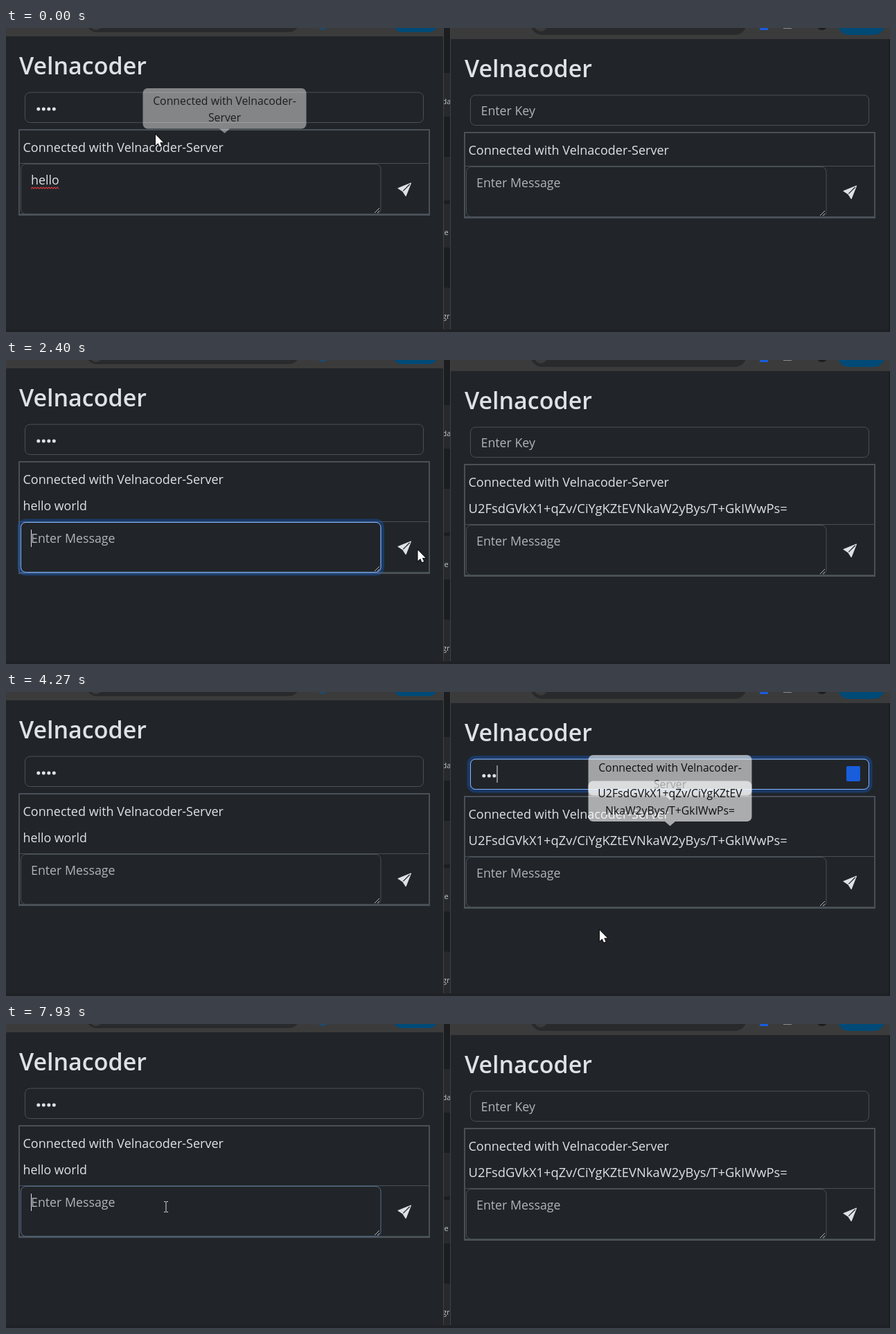
Recreate the animation shown at these times as an HTML page with a canvas. Size 1276 by 439 pixels, loop 8 s.

```html
<!DOCTYPE html>
<html lang="en">
<head>
<meta charset="utf-8">
<title>Encrypted chat</title>
<style>
  html, body { margin: 0; width: 100%; height: 100%; overflow: hidden; background: #212529; }
  canvas { display: block; }
</style>
</head>
<body>
<canvas id="stage" width="1276" height="439"></canvas>
<script>
const g = document.getElementById('stage').getContext('2d');
const LOOP = 8000;
const PAGE = '#212529', LINE = '#495057', TEXT = '#dee2e6', MUTED = '#b0b4b8', BLUE = '#175ddc';
const FONT = '"Open Sans", "Noto Sans", sans-serif';
const NAME = 'Velnacoder';
const STATUS = `Connected with ${NAME}-Server`;
const CIPHER = 'U2FsdGVkX1+qZv/CiYgKZtEVNkaW2yBys/T+GkIWwPs=';
const PLANE = new Path2D('M15.964.686a.5.5 0 0 0-.65-.65L.767 5.855H.766l-.452.18a.5.5 0 0 0-.082.887l.41.26.001.002 4.995 3.178 3.178 4.995.002.002.26.41a.5.5 0 0 0 .886-.083zm-1.833 1.89L6.637 10.07l-.215-.338a.5.5 0 0 0-.154-.154l-.338-.215 7.494-7.494 1.178-.471z');
const ARROW = new Path2D('M0 0V15.5L3.6 12.2L6 17.6L8.6 16.4L6.2 11.2H11Z');

// Pointer path: time, x, y, shape while heading to the next point
const POINTER = [
  [0, 216, 154, 'arrow'], [70, 216, 154, 'arrow'], [270, 240, 212, 'beam'],
  [530, 252, 246, 'beam'], [800, 252, 246, 'beam'], [930, 254.5, 250, 'beam'],
  [2100, 254.5, 250, 'beam'], [2330, 500, 286, 'beam'], [2360, 545, 281, 'arrow'],
  [2480, 690, 262, 'beam'], [2600, 716, 226, 'beam'], [2780, 716, 226, 'beam'],
  [2920, 712, 268, 'beam'], [2980, 712, 268, 'beam'], [3400, 735, 125, 'beam'],
  [3680, 735, 125, 'beam'], [3800, 785, 210, 'beam'], [3900, 825, 295, 'arrow'],
  [4050, 857, 344, 'arrow'], [4470, 857, 344, 'arrow'], [4670, 857, 363, 'arrow'],
  [5340, 857, 363, 'arrow'], [5480, 810, 225, 'beam'], [5600, 772, 136, 'beam'],
  [7070, 772, 136, 'beam'], [7200, 785, 260, 'beam'], [7300, 790, 350, 'arrow'],
  [7400, 785, 400, 'arrow'], [7470, 785, 400, 'arrow'], [7680, 500, 320, 'arrow'],
  [7770, 330, 280, 'beam'], [7870, 231, 264, 'beam'], [8001, 231, 264, 'beam']
];

const clamp = v => Math.max(0, Math.min(1, v));
const fade = (t, from, to) => clamp((t - from) / 150) - clamp((t - to) / 150);
const count = (t, times) => times.filter(k => t >= k).length;
const blink = (t, start) => (t - start) % 1067 < 533;

function rect(x, y, w, h, color) {
  g.fillStyle = color;
  g.fillRect(x, y, w, h);
}
function box(x, y, w, h, r, fill, stroke, lw = 1) {
  g.beginPath();
  g.roundRect(x, y, w, h, r);
  if (fill) { g.fillStyle = fill; g.fill(); }
  if (stroke) { g.strokeStyle = stroke; g.lineWidth = lw; g.stroke(); }
}
function line(points, color, lw = 1) {
  g.beginPath();
  points.forEach(([x, y]) => g.lineTo(x, y));
  g.strokeStyle = color;
  g.lineWidth = lw;
  g.stroke();
}
function disc(x, y, r, color) {
  g.beginPath();
  g.arc(x, y, r, 0, 7);
  g.fillStyle = color;
  g.fill();
}
function text(str, x, y, size = 17.8, color = TEXT, weight = 400, align = 'left') {
  g.font = `${weight} ${size}px ${FONT}`;
  g.textAlign = align;
  g.fillStyle = color;
  g.fillText(str, x, y);
}

function field(x, y, w, h, focus) {
  box(x, y, w, h, 7, PAGE, LINE);
  if (!focus) return;
  const ring = 5 * focus;
  g.save();
  g.globalAlpha = focus;
  box(x - ring / 2, y - ring / 2, w + ring, h + ring, 7 + ring / 2, null, 'rgba(13,110,253,.28)', ring);
  box(x, y, w, h, 7, null, '#86b7fe');
  g.restore();
}

function tooltip(y, lines, alpha) {
  if (alpha <= 0) return;
  g.fillStyle = `rgba(255,255,255,${alpha})`;
  g.beginPath();
  g.roundRect(197.5, y, 236, 58.5, 7);
  g.moveTo(308, y + 58.5);
  g.lineTo(315.5, y + 65);
  g.lineTo(323, y + 58.5);
  g.fill();
  const ink = `rgba(14,16,18,${Math.min(1, alpha * 2)})`;
  lines.forEach((s, i) => text(s, 315.5, y + 23.5 + i * 24.5, 15.8, ink, 400, 'center'));
}

function backdrop() {
  rect(0, 0, 1276, 439, PAGE);
  rect(0, 0, 631, 12, '#3b3b3b');
  box(115, -30, 309, 36, 16, '#282a2c');
  disc(130, -6, 9, '#3b3b3b');
  disc(457, -5, 8, '#1f4a68');
  box(558, -30, 66, 36, 14, '#004a77');

  rect(631, 0, 11, 439, '#1c1d1e');
  [65, 186, 254, 375].forEach(y => rect(632, y, 9, 63, '#28292b'));
  g.save();
  g.beginPath();
  g.rect(631, 0, 11, 439);
  g.clip();
  text('da', 629.5, 110, 11, '#c4c6c8');
  text('te', 628.5, 299, 11, '#c4c6c8');
  text('gr', 630, 420, 11, '#c4c6c8');
  g.restore();
  rect(631, 0, 1, 439, '#404346');
  rect(641, 0, 1, 439, '#404346');

  rect(642, 0, 634, 16, '#3b3b3b');
  box(757, -30, 312, 40, 17, '#282a2c');
  disc(772, -4, 9, '#3b3b3b');
  rect(1088, 0, 12, 3, BLUE);
  rect(1122, 0, 12, 1, '#8b8d8f');
  disc(1178, -5, 8, '#1b1c1d');
  box(1201, -30, 67, 40, 15, '#004a77');
  rect(0, 435, 1276, 4, '#1f2125');
  rect(1274, 16, 2, 423, '#1b1e21');
}

// One chat window; s holds everything that differs between the two
function pane(s) {
  const d = s.message ? 38 : 0;
  text(NAME, 19, 67, 34, TEXT, 600);

  g.strokeStyle = LINE;
  g.lineWidth = 2;
  g.strokeRect(19, 147, 592, 123 + d);
  rect(20, 195 + d, 590, 1, LINE);
  rect(20, 268 + d, 590, 1, LINE);
  text(STATUS, 24.5, 179, 18);
  text(s.message, 24.5, 217, s.size);

  field(27.5, 93, 575, 43.5, s.keyFocus);
  if (s.dots) for (let i = 0; i < s.dots; i++) disc(46.8 + 7.5 * i, 117, 2.5, TEXT);
  else text('Enter Key', 42.5, 122, 17.8, MUTED);
  if (s.keyCaret) rect(43 + 7.5 * s.dots, 102, 1, 25, TEXT);
  if (s.keyFocus > 0.3) box(570, 103, 20, 22, 2, BLUE);

  field(21.5, 196.5 + d, 519.5, 72, s.areaFocus);
  line([[532, 267 + d], [539, 260 + d]], '#b5b8ba');
  line([[536, 267 + d], [539, 264 + d]], '#b5b8ba');
  text(s.draft || 'Enter Message', 36, 226 + d, 17.8, s.draft ? TEXT : MUTED);
  if (s.draft) {
    const wave = [];
    for (let x = 0; x <= 41; x += 2) wave.push([36 + x, 231 + (x % 4 ? -1 : 1)]);
    line(wave, '#d9363e', 1.2);
  }
  if (s.areaCaret) {
    const w = s.draft ? g.measureText(s.draft).width : 0;
    rect(Math.round(36 + w), 207 + d, 1, 25, TEXT);
  }

  g.save();
  g.translate(565.5, 223.5 + d);
  g.scale(1.22, 1.22);
  g.fillStyle = TEXT;
  g.fill(PLANE);
  g.restore();
}

function suggestion() {
  g.save();
  g.shadowColor = 'rgba(0,0,0,.4)';
  g.shadowBlur = 10;
  g.shadowOffsetY = 3;
  box(671.5, 142.5, 576, 74, 2, '#2f343d');
  g.restore();
  box(671.5, 142.5, 576, 74, 2, null, '#444a55');

  disc(701, 180, 16, '#545a63');
  disc(701, 180, 13.5, '#2f343d');
  g.fillStyle = '#545a63';
  g.fill(new Path2D('M689 174L697 168L703 170L699 176L693 178L691 184ZM706 170L713 175L714 184L708 181L704 176ZM696 182L704 184L706 190L700 194L697 188Z'));
  text('gitlab.hopefuls.de', 731.5, 174, 18.8, '#ffffff');
  text('user', 731.5, 200.5, 16.4, '#b4bac4');

  box(1205.5, 173, 22.5, 14, 2, null, '#6f9df1', 1.5);
  for (let y = 176.5; y < 186; y += 3.5)
    for (let x = 1208; x < 1225; x += 4) rect(x, y, y > 183 ? 4 : 2.5, 1.2, '#6f9df1');
}

function pointer(t) {
  const i = POINTER.findIndex(p => p[0] > t) - 1;
  const [t0, x0, y0, shape] = POINTER[i], [t1, x1, y1] = POINTER[i + 1];
  const k = (t - t0) / (t1 - t0);
  g.save();
  g.translate(x0 + (x1 - x0) * k, y0 + (y1 - y0) * k);
  if (shape === 'arrow') {
    g.strokeStyle = '#111';
    g.lineWidth = 2;
    g.stroke(ARROW);
    g.fillStyle = '#fff';
    g.fill(ARROW);
  } else {
    rect(-0.5, -7, 1, 14, '#d8dadc');
    [-8, 7].forEach(y => { rect(-3, y, 2.5, 1, '#d8dadc'); rect(0.5, y, 2.5, 1, '#d8dadc'); });
  }
  g.restore();
}

function draw(t) {
  backdrop();

  const typed = [600, 800, 930, 1000, 1130, 1270];
  const draft = t < 1530 ? 'hello world'.slice(0, 5 + count(t, typed)) : '';
  const lastKey = typed.filter(k => k <= t).pop() || 470;
  const areaOn = (t >= 470 && t < 3670) || t >= 7900;
  const sent = t >= 1730;
  pane({
    message: sent ? 'hello world' : '', size: 17.8,
    dots: 4, keyFocus: 0, keyCaret: false,
    draft,
    areaFocus: fade(t, 470, 3670) + fade(t, 7895, 9999),
    areaCaret: areaOn && blink(t, t >= 7900 ? 7900 : lastKey)
  });
  tooltip(87, [`Connected with ${NAME}-`, 'Server'], 0.44 * (1 - clamp((t - 200) / 150)));

  const keys = [4070, 4200, 4270, 4400];
  const dots = t < 6600 ? count(t, keys) : 0;
  const keyOn = (t >= 3670 && t < 5130) || (t >= 6000 && t < 7450);
  const keyStart = [3670, ...keys, 6130, 6600].filter(k => k <= t).pop();
  g.save();
  g.translate(643, 4);
  pane({
    message: sent ? CIPHER : '', size: 18.4,
    dots,
    keyFocus: fade(t, 3670, 5130) + fade(t, 6000, 7450),
    keyCaret: keyOn && blink(t, keyStart),
    draft: '', areaFocus: 0, areaCaret: false
  });
  tooltip(87, [`Connected with ${NAME}-`, 'Server'], 0.58 * fade(t, 3800, 5400));
  const strength = 0.5 + 0.12 * clamp((t - 3000) / 150);
  tooltip(124.5, [CIPHER.slice(0, 24), CIPHER.slice(24)], strength * fade(t, 2480, 5400));
  g.restore();

  if (t >= 6700 && t < 7070) suggestion();
  pointer(t);
}

const start = performance.now();
function tick() {
  draw((performance.now() - start) % LOOP);
  requestAnimationFrame(tick);
}
tick();
</script>
</body>
</html>
```
